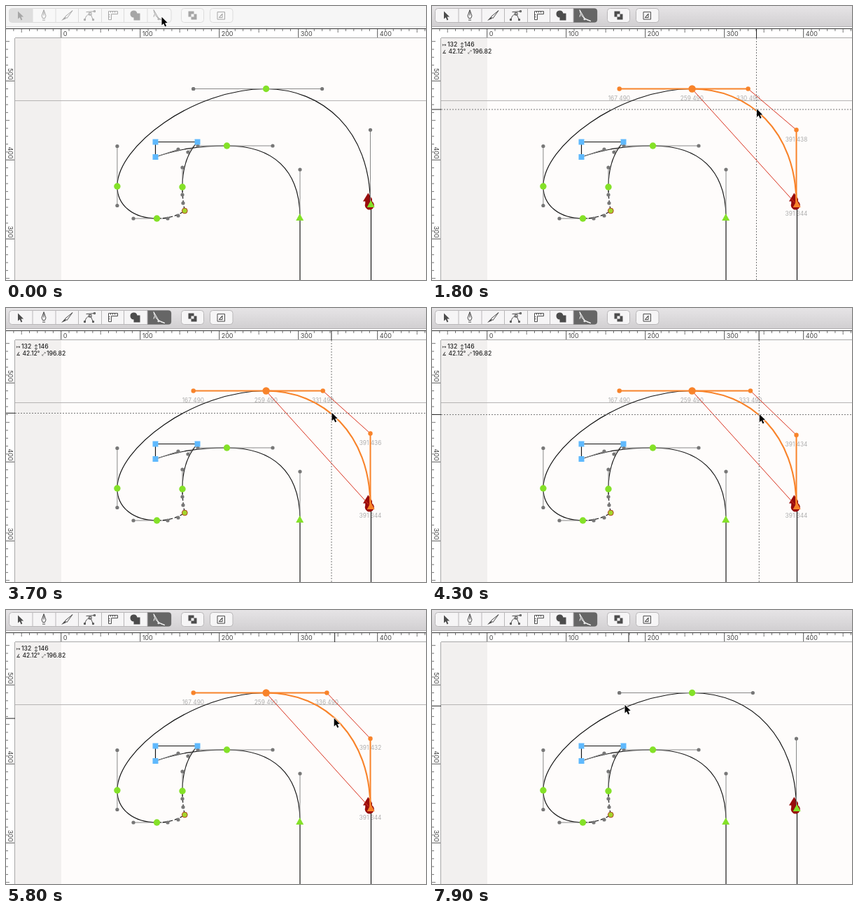
These frames come from a looping animation (600x392 px, 8 s). An HTML page:

```html
<!DOCTYPE html>
<html lang="en">
<head>
<meta charset="utf-8">
<title>Curve tool</title>
<style>
html, body { margin: 0; width: 100%; height: 100%; overflow: hidden; background: #fefcfb; }
svg { display: block; width: 600px; height: 392px; }
text { font-family: Inter, "DejaVu Sans", sans-serif; }
</style>
</head>
<body>
<svg id="stage" viewBox="0 0 600 392"></svg>
<script>
const LOOP = 8000, STEP = 100;
const ORANGE = '#f8832a', GREEN = '#84e128', GREY = '#777', INK = '#111';
const X = u => 78.7 + u * 1.13;
const Y = v => 118.5 + (490 - v) * 1.13;

// Cursor tip: time, x, y
const moves = [
  [700, 222, 16], [800, 345, 100], [950, 531, 203], [1100, 507, 183], [1600, 466, 150],
  [1700, 463.5, 147.5], [2900, 463.5, 147.5], [3700, 465, 150], [5000, 470, 154.5],
  [5750, 470, 154.5], [6300, 450, 160], [6850, 450, 160], [7400, 350, 146], [7900, 275, 136]
];

function cursorAt(t) {
  const i = moves.findIndex(m => m[0] >= t);
  if (i === 0) return moves[0].slice(1);
  if (i < 0) return moves[moves.length - 1].slice(1);
  const a = moves[i - 1], b = moves[i], k = (t - a[0]) / (b[0] - a[0]);
  return [a[1] + (b[1] - a[1]) * k, a[2] + (b[2] - a[2]) * k];
}

const path = (d, stroke, width = 1, extra = '') =>
  `<path d="${d}" fill="none" stroke="${stroke}" stroke-width="${width}" ${extra}/>`;
const rect = (x, y, w, h, fill, extra = '') =>
  `<rect x="${x}" y="${y}" width="${w}" height="${h}" fill="${fill}" ${extra}/>`;
const dot = (x, y, r, fill, extra = '') =>
  `<circle cx="${x}" cy="${y}" r="${r}" fill="${fill}" ${extra}/>`;
const tri = (x, y, fill) => `<path d="M${x} ${y - 6}l5.5 10h-11z" fill="${fill}"/>`;
const text = (x, y, s, size, fill, extra = '') =>
  `<text x="${x}" y="${y}" font-size="${size}" fill="${fill}" ${extra}>${s}</text>`;

// Toolbar icons, centred on 0,0: filled part, stroked part
const icons = [
  ['M-3.5-6V5L-.8 2.6 1 6.8 2.8 6 1 2 4.6 1.8z', ''],
  ['', 'M0-8L3 .5 1.6 4H-1.6L-3 .5zM0-7V0M-2 6.5H2'],
  ['M-3 2L-8 7.5-1 4.5z', 'M8-7L-2.5 1.5 0 4z'],
  ['', 'M-7 7C-6 1-3-2 1-2M1-2C3 1 4 4 5 7M-5-5L7-6M-1-4h3.5v3.5h-3.5zM-8 5h2v2h-2zM4 5h2v2h-2zM6-7h2v2h-2z'],
  ['', 'M-6-6H7V-2H-2V6H-6zM-3-6v2M0-6v2M3-6v2M-6-1h2M-6 2h2'],
  ['M-7-2a5 5 0 0 1 9.9-1H7V7H-2V3A5 5 0 0 1-7-2z', ''],
  ['', 'M-7-8C-6 0-1 6 9 8M-7-8L0 4M9 8L2 5M-6-1.5L-7 2M-1 4h2v2h-2z'],
  ['M-6-6H2V-2H6V6H-2V2H-6zM-2-2V2H2V-2z', ''],
  ['', 'M-5-5H5.5V5.5H-5zM-2.5 3H2V-2.5zM2-2.5L-2.5 3']
];

function toolbar(active, picked) {
  const line = active ? '#b9b7b9' : '#dcdcdc', ink = active ? '#4c4c4c' : '#a6a6a6';
  const face = active ? '#f6f5f6' : '#f8f8f8';
  const lefts = [4.5, 38, 71, 103.5, 136.5, 168.5, 202, 250.5, 291];
  let s = rect(0, 0, 600, 30, active ? 'url(#bar)' : '#f6f6f6')
    + rect(0, 29, 600, 1, active ? '#b4b2b4' : '#d8d8d8');
  for (const [x, w] of [[4.5, 231.5], [250.5, 32], [291.5, 32.5]])
    s += rect(x, 3.5, w, 20, face, `rx="4" stroke="${line}"`);
  const x0 = lefts[picked], x1 = lefts[picked + 1];
  const shape = picked === 6
    ? `M${x0} 3.5H232a4 4 0 0 1 4 4V19.5a4 4 0 0 1-4 4H${x0}z`
    : `M${x1} 3.5H8.5a4 4 0 0 0-4 4V19.5a4 4 0 0 0 4 4H${x1}z`;
  s += `<path d="${shape}" fill="${active ? '#666' : '#dedede'}"/>`;
  for (const x of lefts.slice(1, 7)) s += rect(x - .5, 4, 1, 19, line);
  icons.forEach(([fill, stroke], i) => {
    const c = active && i === picked ? '#fff' : ink;
    s += `<g transform="translate(${lefts[i] + 16} 13.6)">`
      + `<path d="${fill}" fill="${c}" fill-rule="evenodd"/>${path(stroke, c, 1)}</g>`;
  });
  return s;
}

function rulers() {
  let minor = '', major = '', s = rect(0, 30, 600, 16, '#fff') + rect(0, 30, 13, 362, '#fff');
  for (let u = -70; u < 470; u += 10) {
    const x = X(u).toFixed(1);
    if (u % 100) minor += `M${x} 33v${u % 50 ? 3 : 5}`;
    else {
      major += `M${x} 33v12`;
      s += text(X(u) + 3, 43.3, u, 9, '#444');
    }
  }
  for (let v = 250; v < 560; v += 10) {
    const y = Y(v).toFixed(1);
    if (v % 100) minor += `M0 ${y}h${v % 50 ? 3 : 5}`;
    else {
      major += `M0 ${y}h12`;
      s += text(0, 0, v, 9, '#444',
        `text-anchor="end" transform="translate(2.8 ${Y(v) - 1.5}) rotate(90)"`);
    }
  }
  return s + path(minor, '#666', .9) + path(major, '#555')
    + path('M0 32.5H600', '#333') + path('M13 45.5H600M12.5 46V392', '#a8a8a8');
}

const handleDots = [[267.7, 118.5], [158.9, 200.5], [158.9, 285.5], [182, 304], [231, 304],
  [246, 300], [253, 282], [252, 270], [252, 231], [260, 209], [246, 205], [274, 200],
  [381, 200], [420, 234]];
const nodes = [[158.9, 258], [215.5, 304], [252, 259], [315.5, 200]];
const outline = 'M371.4 118.5C267.7 118.5 158.9 200.5 158.9 258C158.9 285.5 182 304 215.5 304'
  + 'M252 259C252 231 260 209 273.5 194.5H213.5V216'
  + 'C246 205 274 200 315.5 200C381 200 420 234 420 303V392M521.5 284V392';
const terminal = 'M215.5 304C231 304 246 300 255.3 293C253 282 252 270 252 259';
const handles = 'M158.9 200.5V285.5M182 304H231M252 270V231'
  + 'M260 209L273.5 194.5M213.5 216L246 205M274 200H381M420 234V303';

function glyph(h1, h2, selected) {
  const ax = X(h1), by = Y(h2), ex = X(391), top = Y(490), main = selected ? ORANGE : INK;
  const hue = selected ? ORANGE : GREY, r = selected ? 3.2 : 2.6;
  let s = '';
  if (selected) {
    for (const [u, v] of [[167, 490], [259, 490], [h1, 490], [391, h2], [391, 344]])
      s += text(X(u), Y(v) + 16.3, `${u} ${v}`, 8.3, '#adadad', 'text-anchor="middle"');
  }
  s += path(outline, INK, 1.15) + path(handles, '#888')
    + path(terminal, INK, 1.15, 'stroke-dasharray="6 2.5"');
  s += '<path d="M517.3 267.5L523 276V279.5A6.6 6.6 0 1 1 513.2 282.5V279.5H510z" fill="#980c0c"/>';
  s += path(`M${ex} 284C${ex} ${by} ${ax} ${top} 371.4 ${top}`, main, selected ? 2.1 : 1.15);
  s += path(`M267.7 ${top}H${ax}M${ex} 284V${by}`, selected ? ORANGE : '#888', selected ? 2 : 1);
  if (selected) s += path(`M371.4 ${top}L518 281M${ax} ${top}L${ex} ${by}`, '#d8301c');
  for (const [x, y] of handleDots) s += dot(x, y, 2.6, GREY);
  for (const [x, y] of [[267.7, top], [ax, top], [ex, by]]) s += dot(x, y, r, hue);
  for (const [x, y] of nodes) s += dot(x, y, 4.7, GREEN);
  s += dot(371.6, top, selected ? 5.2 : 4.7, selected ? ORANGE : GREEN);
  s += dot(255.3, 293, 3.9, '#a4d42a', 'stroke="#b5452a"');
  for (const [x, y] of [[273.5, 194.5], [213.5, 194.5], [213.5, 216]])
    s += rect(x - 4, y - 4, 8, 8, '#5fb9fd');
  return s + tri(419.7, 303, GREEN) + tri(521.2, 284, selected ? ORANGE : GREEN);
}

const readout = [[14.5, 58, '↦', 7], [22, 58, '132', 8.6], [40, 58, '↕', 7], [46, 58, '146', 8.6],
  [14.5, 68, '∡', 7], [23.5, 68, '42.12°', 8.4], [51, 68, '⤢', 7], [58, 68, '196.82', 8.6]]
  .map(([x, y, s, size]) => text(x, y, s, size, '#222', 'font-weight="500"')).join('');

const stage = document.getElementById('stage');
stage.innerHTML = `<defs><linearGradient id="bar" x2="0" y2="1">
  <stop stop-color="#e6e4e6"/><stop offset="1" stop-color="#d1cfd1"/></linearGradient></defs>`
  + rect(0, 0, 600, 392, '#fefcfb') + rect(13, 46, 66, 346, '#f2f0ef')
  + path('M13 135.5H600', '#b5b3b3')
  + '<g id="art"></g>' + rulers() + '<g id="over"></g><g id="tools"></g>'
  + '<path id="arrow" d="M0 0V11.6L2.6 9.2 4.7 13.6 6.6 12.7 4.6 8.4 8.2 8.1z"'
  + ' stroke="#fff" stroke-width="1.2" paint-order="stroke"/>';
const [art, over, tools, arrow] =
  ['art', 'over', 'tools', 'arrow'].map(id => document.getElementById(id));

function update(t) {
  const [x, y] = cursorAt(t);
  const selected = t >= 1700 && t < 6500;
  const pressed = t >= 1800 && t < 2300 || t >= 2900 && t < 5800;
  const [dx, dy] = cursorAt(Math.min(Math.max(t, 2900), 5700));
  const h1 = 330 + Math.round((dx - 463.5) * .9), h2 = 438 - Math.round((dy - 147.5) * .9);
  art.innerHTML = glyph(h1, h2, selected) + (selected ? readout : '')
    + (pressed ? path(`M${x} 46V392M13 ${y + .5}H600`, '#777', 1, 'stroke-dasharray="2 2"') : '');

  // Ruler marks trail the cursor slightly
  const [mx, my] = cursorAt(t - 40);
  over.innerHTML = my > 33 ? path(`M${mx} 33V46M0 ${my + .5}H13`, '#222') : '';
  tools.innerHTML = toolbar(t >= 400, t >= 500 ? 6 : 0);
  arrow.setAttribute('transform', `translate(${x + .5} ${y - .2})`);
}

const start = performance.now();
let last = -1;
function tick() {
  const t = Math.floor((performance.now() - start) % LOOP / STEP) * STEP;
  if (t !== last) update(last = t);
  requestAnimationFrame(tick);
}
tick();
</script>
</body>
</html>
```
